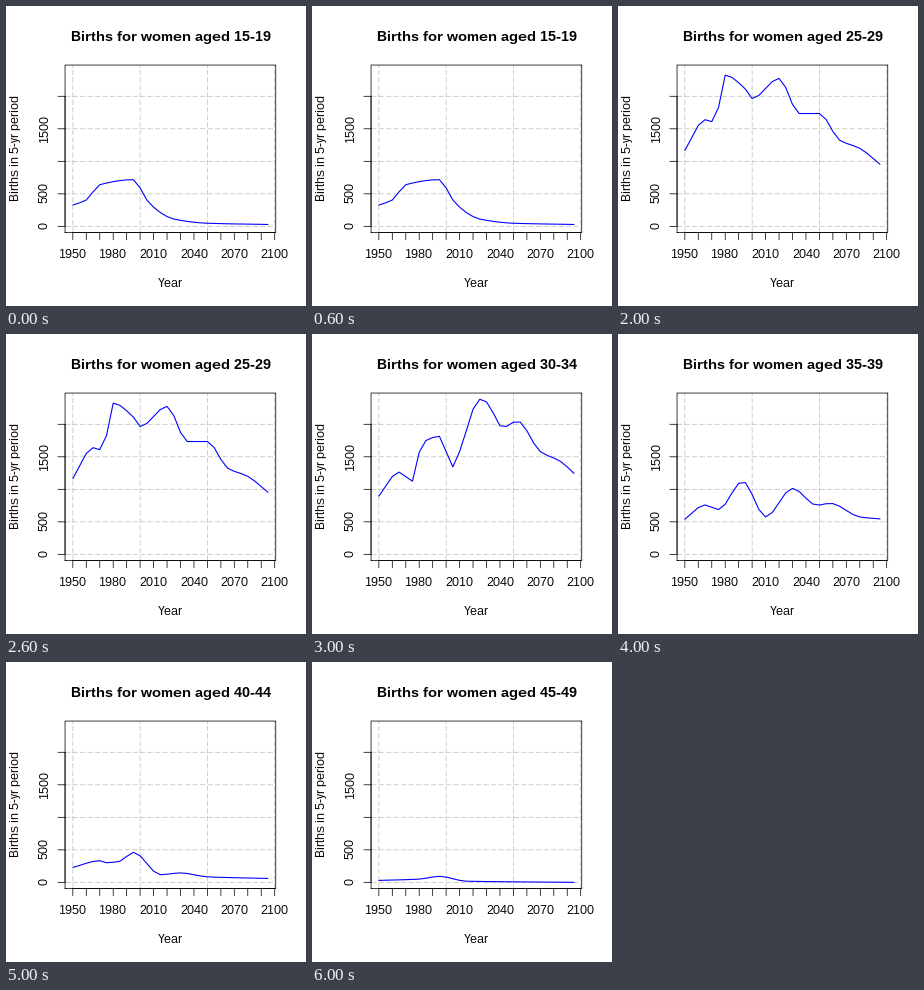
These frames come from a looping animation (300x300 px, 7000 ms). A matplotlib script:

```python
import matplotlib.pyplot as plt
import numpy as np
from matplotlib.animation import FuncAnimation

SIZE = 300
LEFT, TOP, RIGHT, BOTTOM = 59.04, 59.04, 269.76, 226.56
TICK = 7.2
PAD = 0.04 / 1.08  # share of the plot left free on each side
MAX_BIRTHS = 2385

plt.rcParams.update({
    "font.family": "Liberation Sans",
    "text.hinting": "default",
    "text.hinting_factor": 1,
    "text.kerning_factor": 6,
})

# Key points of each curve: births per 5-year period by year
keys = {
    "15-19": {1950: 328, 1960: 405, 1970: 640, 1995: 718, 2005: 405,
              2015: 212, 2025: 112, 2050: 48, 2095: 29},
    "20-24": {1950: 1055, 1965: 1475, 1970: 1775, 1980: 2165, 1990: 2277,
              2000: 2065, 2010: 1450, 2030: 650, 2065: 318, 2095: 235},
    "25-29": {1950: 1165, 1965: 1640, 1970: 1610, 1975: 1825, 1980: 2325,
              1995: 2110, 2000: 1965, 2020: 2275, 2035: 1735, 2050: 1735,
              2065: 1325, 2080: 1200, 2095: 955},
    "30-34": {1950: 895, 1965: 1265, 1975: 1125, 1980: 1570, 1985: 1750,
              1995: 1815, 2005: 1345, 2010: 1580, 2025: 2385, 2030: 2345,
              2042: 1950, 2053: 2050, 2070: 1580, 2085: 1430, 2095: 1245},
    "35-39": {1950: 540, 1965: 760, 1975: 688, 1993: 1125, 2010: 575,
              2030: 1015, 2048: 755, 2058: 785, 2080: 575, 2095: 545},
    "40-44": {1950: 230, 1970: 332, 1975: 302, 1985: 325, 1995: 462,
              2015: 118, 2030: 145, 2050: 85, 2095: 60},
    "45-49": {1950: 30, 1980: 50, 1995: 92, 2015: 18, 2095: 0},
}
ages = list(keys)


def smooth(points, at):
    """Monotone cubic curve through the points: flat at each turn."""
    x, y = (np.array(list(v), float) for v in (points, points.values()))
    step = np.diff(x)
    slope = np.diff(y) / step
    before, after = slope[:-1], slope[1:]
    same_way = before * after > 0
    total = np.where(same_way, before + after, 1)
    inner = np.where(same_way, 2 * before * after / total, 0)
    m = np.concatenate([slope[:1], inner, slope[-1:]])

    i = np.clip(np.searchsorted(x, at, side="right") - 1, 0, len(step) - 1)
    h = step[i]
    t = (at - x[i]) / h
    ease = t * t * (3 - 2 * t)
    bend = t * (1 - t) * h * ((1 - t) * m[i] - t * m[i + 1])
    return y[i] + ease * (y[i + 1] - y[i]) + bend


def x_of(year):
    share = PAD + (1 - 2 * PAD) * (year - 1950) / 145
    return LEFT + share * (RIGHT - LEFT)


def y_of(value):
    share = PAD + (1 - 2 * PAD) * value / MAX_BIRTHS
    return BOTTOM - share * (BOTTOM - TOP)


fig = plt.figure(figsize=(SIZE / 72, SIZE / 72), dpi=72, facecolor="white")
ax = fig.add_axes([0, 0, 1, 1])
ax.set(xlim=(0, SIZE), ylim=(SIZE, 0))
ax.axis("off")


def stroke(xs, ys, color="black", **style):
    style = {"lw": 0.75, "zorder": 3, "snap": False,
             "solid_capstyle": "round", "solid_joinstyle": "round", **style}
    return ax.plot(xs, ys, color=color, **style)[0]


def label(x, y, text, size=12, **style):
    return ax.text(x, y, text, size=size, ha="left", va="baseline",
                   rotation_mode="anchor", **style)


years = np.arange(1950, 2101, 10)
counts = np.arange(0, 2001, 500)

# Grid
grid = {"color": "#bebebe", "dashes": (7, 3), "zorder": 1}
for x in x_of(years[::5]):
    stroke([x, x], [BOTTOM, TOP], **grid)
for y in y_of(counts):
    stroke([LEFT, RIGHT], [y, y], **grid)

# Box, axes and ticks
stroke([LEFT, RIGHT, RIGHT, LEFT, LEFT], [BOTTOM, BOTTOM, TOP, TOP, BOTTOM])
stroke(x_of(years[[0, -1]]), [BOTTOM, BOTTOM])
stroke([LEFT, LEFT], y_of(counts[[0, -1]]))
for x in x_of(years):
    stroke([x, x], [BOTTOM, BOTTOM + TICK])
for y in y_of(counts):
    stroke([LEFT, LEFT - TICK], [y, y])

# Labels; a digit is 7 px wide
for year in years[::3]:
    label(x_of(year) - 14, 252, str(year))
for count in (0, 500, 1500):
    text = str(count)
    label(42, y_of(count) + 3.5 * len(text) - 1.2, text, rotation=90)
label(151.4, 281, "Year")
label(13, 194.8, "Births in 5-yr period", rotation=90)

title = label(65, 35, "", size=14.4, weight="bold")
curve = stroke([], [], color="blue", lw=1.1, zorder=2)
curve_years = np.arange(1950, 2096, 5)


def update(i):
    age = ages[i]
    title.set_text(f"Births for women aged {age}")
    curve.set_data(x_of(curve_years), y_of(smooth(keys[age], curve_years)))
    return title, curve


anim = FuncAnimation(fig, update, frames=len(ages), interval=1000,
                     repeat=True, repeat_delay=0)
plt.show()
```
